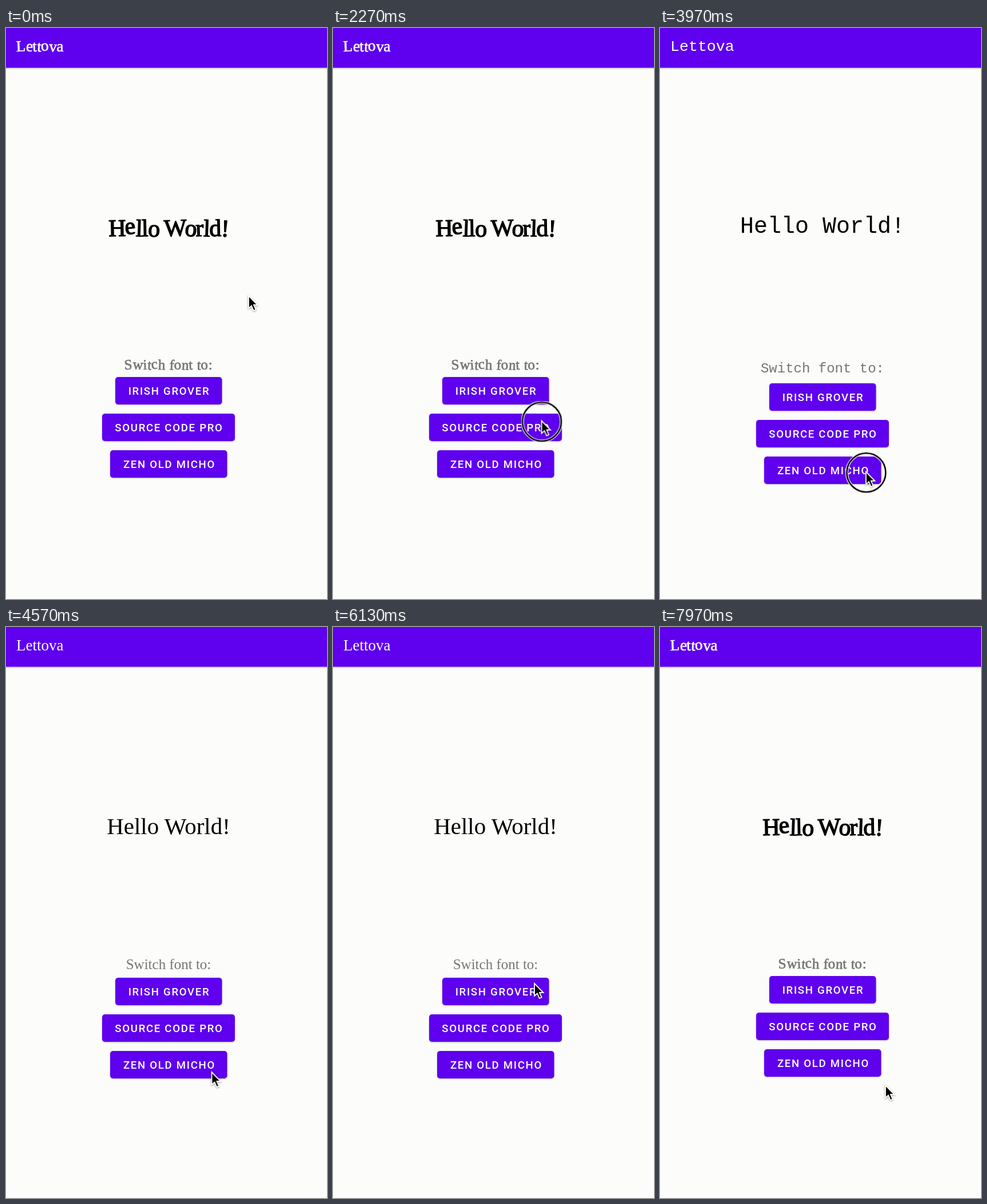
An HTML page that plays this animation: 561 px wide and 998 px high, repeating every 8 s.

```html
<!DOCTYPE html>
<html lang="en">
<head>
<meta charset="utf-8">
<title>Font switcher</title>
<style>
  html, body { margin: 0; width: 100%; height: 100%; overflow: hidden; background: #fcfcfa; }
  svg { display: block; width: 100%; height: 100%; }

  .bar, .button { fill: #5f00ee; }
  .bar { filter: drop-shadow(0 1px 1.5px #0004); }
  .button { filter: drop-shadow(0 1.5px 1.2px #0004); }
  .label {
    font: 500 18.67px Roboto, sans-serif;
    letter-spacing: 1.667px;
    text-anchor: middle;
    fill: #fff;
  }

  .title { fill: #fff; }
  .hello, .prompt { text-anchor: middle; }
  .hello { fill: #000; }
  .prompt { fill: #757575; }

  /* A thin outline evens the stroke contrast into flared, hand-cut letters. */
  .quirky { font: 27px "Liberation Serif", serif; stroke-width: .7; stroke-linejoin: round; }
  .quirky .title { stroke: #fff; }
  .quirky .hello { font-size: 42px; letter-spacing: -1px; stroke: #000; stroke-width: 1.4; }
  .quirky .prompt { font-size: 25px; letter-spacing: .35px; stroke: #757575; }

  .mono { font: 26.6px "Liberation Mono", monospace; }
  .mono .hello { font-size: 40px; }
  .mono .prompt { font-size: 24px; }

  .mincho { font: 27px "Liberation Serif", serif; }
  .mincho .hello { font-size: 41px; }
  .mincho .prompt { font-size: 25px; }

  /* Every timeline shares one 8 s loop. */
  .quirky, .mono, .mincho, .buttons, .press { animation: 8s step-end infinite; }
  .mono, .mincho, .press { visibility: hidden; }
  .quirky { animation-name: quirky; }
  .mono { animation-name: mono; }
  .mincho { animation-name: mincho; }
  .buttons { animation-name: shift; }
  .press { animation-name: press; }
  .pointer { animation: wander 8s ease-in-out infinite; }

  @keyframes quirky {
    0%, 81.9% { visibility: visible; }
    30.6% { visibility: hidden; }
    100% { visibility: visible; }
  }
  @keyframes mono {
    0%, 52.5%, 100% { visibility: hidden; }
    30.6% { visibility: visible; }
  }
  @keyframes mincho {
    0%, 81.9%, 100% { visibility: hidden; }
    52.5% { visibility: visible; }
  }
  @keyframes shift {
    0%, 81.9%, 100% { transform: translateY(0); }
    30.6% { transform: translateY(11px); }
    52.5% { transform: translateY(3px); }
  }
  @keyframes press {
    0%, 29.5%, 52%, 81%, 100% { visibility: hidden; }
    26.5%, 49.4%, 78.7% { visibility: visible; }
  }
  @keyframes wander {
    0%, 3% { transform: translate(424px, 467px); }
    11.5%, 19% { transform: translate(368.5px, 633.5px); }
    24%, 42% { transform: translate(364.5px, 685.5px); }
    47.5% { transform: translate(360px, 774px); }
    55%, 65% { transform: translate(359.5px, 777px); }
    72.5%, 82.5% { transform: translate(352px, 622px); }
    89.6% { transform: translate(425px, 845px); animation-timing-function: ease-out; }
    93.75% { transform: translate(448px, 965px); }
    99%, 100% { transform: translate(394px, 800px); }
  }
</style>
</head>
<body>
<svg viewBox="0 0 561 998">
  <rect width="561" height="998" fill="#fcfcfa"/>
  <rect class="bar" x="-5" y="-5" width="571" height="74.5"/>

  <g class="quirky">
    <text class="title" x="18" y="41" dy="0 -1 1 0 -1 1 0" rotate="-2 5 -2 3 -4 3 0">Lettova</text>
    <text class="hello" x="284" y="364" dy="0 -3 3 0 0 0 0 -1 1" rotate="-1 -6 2 -1 3 0 -2 5 -2 2 -1 3">Hello World!</text>
    <text class="prompt" x="284" y="597" dy="0 -1 1 0 -1 1" rotate="-3 3 -2 3 -4 1 0 3 -3 3 -2 0 3 -3 0">Switch font to:</text>
  </g>
  <g class="mono">
    <text class="title" x="18" y="40">Lettova</text>
    <text class="hello" x="284" y="358">Hello World!</text>
    <text class="prompt" x="284" y="602">Switch font to:</text>
  </g>
  <g class="mincho">
    <text class="title" x="18" y="41">Lettova</text>
    <text class="hello" x="284" y="362">Hello World!</text>
    <text class="prompt" x="284" y="598">Switch font to:</text>
  </g>

  <g class="buttons">
    <rect class="button" x="191" y="610" width="186.5" height="48" rx="5"/>
    <text class="label" x="285" y="641">IRISH GROVER</text>
    <rect class="button" x="168" y="674" width="232" height="48" rx="5"/>
    <text class="label" x="285" y="705">SOURCE CODE PRO</text>
    <rect class="button" x="182" y="738" width="204.5" height="48" rx="5"/>
    <text class="label" x="285.5" y="769">ZEN OLD MICHO</text>
  </g>

  <g class="pointer">
    <g class="press" fill="none">
      <circle cx=".5" cy="2.5" r="34" stroke="#fff" stroke-width="5"/>
      <circle cx=".5" cy="2.5" r="34" stroke="#000" stroke-width="2.6"/>
    </g>
    <path d="M0 1V23L5 18.5L8.8 27L12.6 25.3L9 17H15.6Z" stroke="#fff" stroke-width="1.8"
      style="filter: drop-shadow(0 1.5px 1.5px #0006)"/>
  </g>
</svg>
</body>
</html>
```
